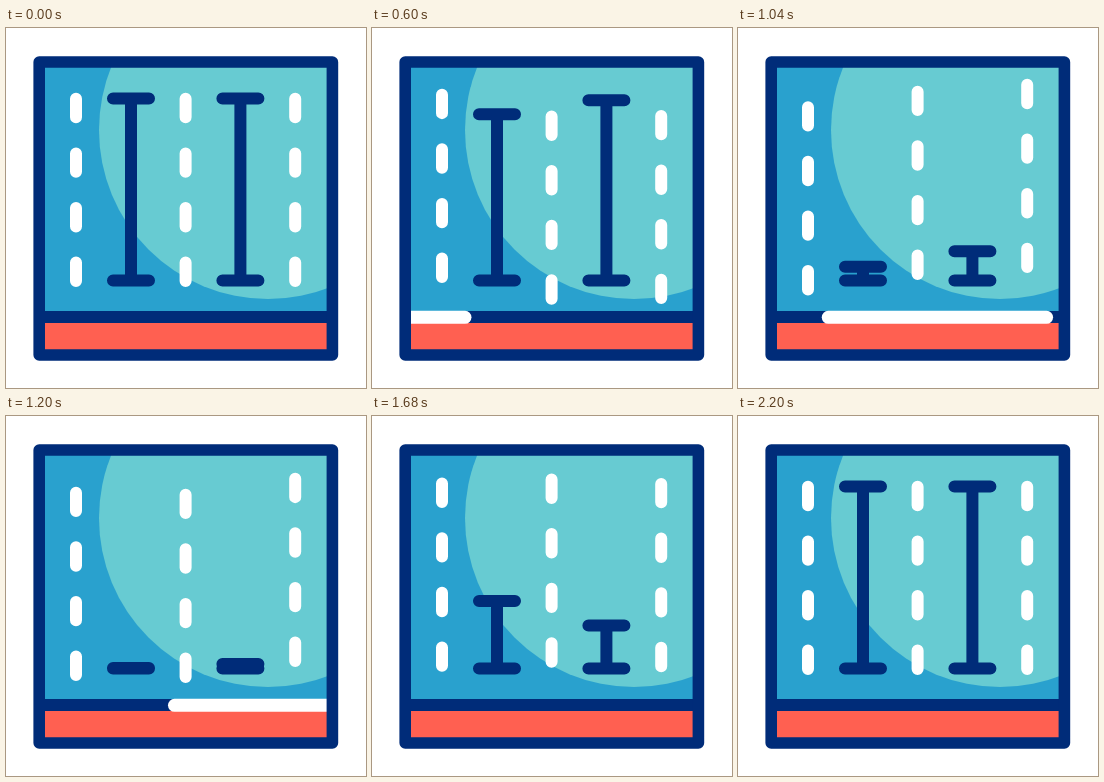
These frames come from a looping animation (360 px wide and 360 px high, 2.48 s). An HTML page:

```html
<!DOCTYPE html>
<html lang="en">
<head>
<meta charset="utf-8">
<style>
html, body { margin: 0; width: 100%; height: 100%; overflow: hidden; background: #fff; }
svg { display: block; width: 100vw; height: 100vh; }
</style>
</head>
<body>
<svg viewBox="0 0 360 360" fill="none" stroke-width="12" stroke-linecap="round" stroke-linejoin="round">
  <clipPath id="inside"><rect x="36" y="36" width="288" height="288"/></clipPath>
  <g clip-path="url(#inside)">
    <rect x="36" y="36" width="288" height="250" fill="#29a1ce"/>
    <circle cx="262" cy="102" r="169" fill="#67cbd2"/>
    <rect x="36" y="289" width="288" height="34" fill="#ff6051"/>
    <path d="M33 289H327" stroke="#002c79"/>
    <path id="slider" stroke="#fff" stroke-width="13"/>
    <g stroke="#fff">
      <path class="dashes"/><path class="dashes"/><path class="dashes"/>
    </g>
    <g stroke="#002c79"><path class="beam"/><path class="beam"/></g>
  </g>
  <rect x="33.2" y="34" width="293.2" height="293" stroke="#002c79" stroke-width="11.6"/>
</svg>
<script>
const LOOP = 2480;
const slider = document.getElementById('slider');
const dashes = document.querySelectorAll('.dashes');
const beams = document.querySelectorAll('.beam');

const clamp = v => Math.min(1, Math.max(0, v));
const smooth = s => s * s * (3 - 2 * s);

// Cubic bezier easing with control points (a, 0) and (b, 1).
function ease(s, a, b) {
  let lo = 0, hi = 1;
  for (let i = 0; i < 20; i++) {
    const u = (lo + hi) / 2, v = 1 - u;
    if (3 * a * u * v * v + 3 * b * u * u * v + u * u * u < s) lo = u; else hi = u;
  }
  return smooth((lo + hi) / 2);
}

// Fading up and down swing: [time, offset].
const swing = [[0, 0], [360, 21], [740, -15], [1085, 9.5], [1475, -7.5], [1850, 0]];
function sway(t) {
  if (t <= 0) return 0;
  const i = swing.findIndex(k => k[0] > t);
  if (i < 0) return 0;
  const [t0, y0] = swing[i - 1], [t1, y1] = swing[i];
  return y0 + (y1 - y0) * smooth((t - t0) / (t1 - t0));
}

function squash(t) {
  const down = clamp((t - 480) / 760), up = clamp((t - 1240) / 840);
  return up > 0 ? 1 - ease(up, .58, .69) : down > 0 ? ease(down, .333, .4) : 0;
}

function draw(t) {
  dashes.forEach((el, i) => {
    const x = 70 + 109.6 * i, y = 70.8 + sway(t - 170 * i);
    el.setAttribute('d', [0, 1, 2, 3].map(n => `M${x} ${y + 54.6 * n}v18.4`).join(''));
  });
  beams.forEach((el, i) => {
    const x = 125 + 109.4 * i, y = 70.5 + 182 * squash(t - 80 * i);
    el.setAttribute('d', `M${x - 18} ${y}h36M${x} ${y}V252.5M${x - 18} 252.5h36`);
  });
  const tail = 168 + .489 * (t - 1200), head = 92.5 + .49 * (t - 600);
  slider.setAttribute('d', head > 20 && tail < 335 ? `M${tail} 289.3H${head}` : '');
}

const start = performance.now();
function tick() {
  draw((performance.now() - start) % LOOP);
  requestAnimationFrame(tick);
}
tick();
</script>
</body>
</html>
```
